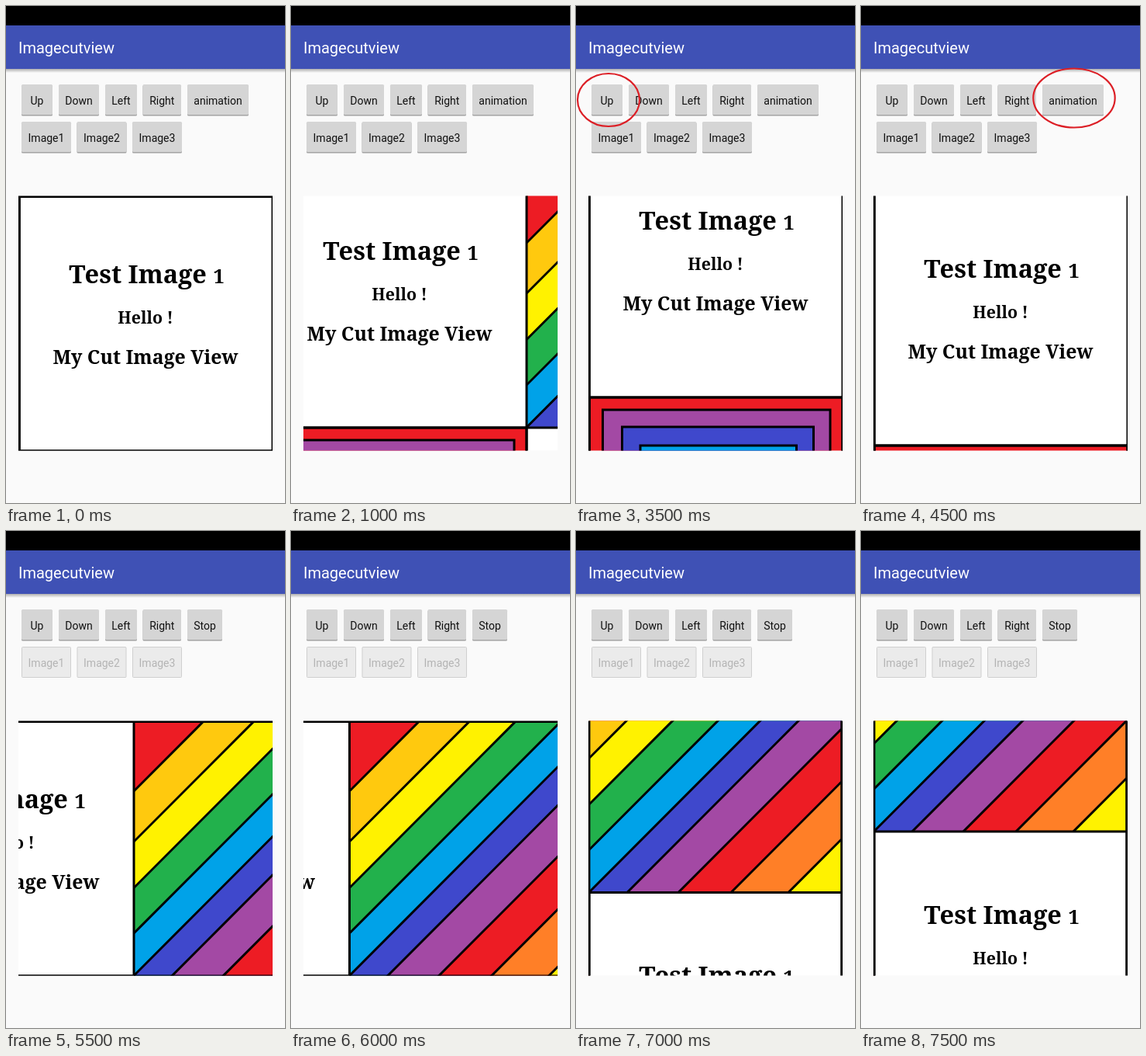
Animation of 360x640 px, one loop 8000 ms. Source, as an HTML page:

```html
<!DOCTYPE html>
<html lang="en">
<head>
<meta charset="utf-8">
<title>Image cut view</title>
<style>
html, body { margin: 0; height: 100%; overflow: hidden; background: #fafafa; }
svg { display: block; width: 100vw; height: 100vh; }
.ui { font: 14px Roboto, sans-serif; }
.title { font: 20px Roboto, sans-serif; fill: #fff; }
.words { font-family: "Noto Serif", serif; font-weight: 700; text-anchor: middle; }
.frame { fill: none; stroke: #000; stroke-width: 3; }
.ring { fill: none; stroke: #dc1f26; stroke-width: 2.2; }
</style>
</head>
<body>
<svg viewBox="0 0 360 640">
  <defs>
    <linearGradient id="shade" x2="0" y2="1">
      <stop stop-opacity=".3"/><stop offset="1" stop-opacity="0"/>
    </linearGradient>
    <clipPath id="view"><rect x="16" y="244.4" width="328" height="328.2"/></clipPath>
    <clipPath id="cell"><rect x="344" y="245" width="326" height="328"/></clipPath>
    <g id="words" class="words">
      <text x="181.5" y="356.5" font-size="32.5">Test Image <tspan font-size="25.5">1</tspan></text>
      <text x="180" y="409" font-size="21.3">Hello !</text>
      <text x="180" y="461.3" font-size="24.8">My Cut Image View</text>
    </g>
  </defs>
  <rect width="360" height="640" fill="#fafafa"/>
  <rect y="81" width="360" height="5" fill="url(#shade)"/>
  <rect y="25" width="360" height="56" fill="#3f51b5"/>
  <rect width="360" height="25"/>
  <text class="title" x="16" y="61">Imagecutview</text>
  <g id="buttons" class="ui"></g>
  <g clip-path="url(#view)">
    <g id="world">
      <rect x="16" y="244" width="656" height="660" fill="#fff"/>
      <use href="#words"/>
      <use href="#words" x="327" y="335"/>
      <g id="rainbow" clip-path="url(#cell)"></g>
      <g id="nested"></g>
      <path class="frame" d="M17.4 245.5H669.7V900H17.4ZM344 245V900M17 573H670"/>
    </g>
  </g>
  <ellipse id="ring" class="ring"/>
</svg>
<script>
const $ = id => document.getElementById(id);
const STEP = 500;
const red = '#ed1c24', yellow = '#fff200', cyan = '#00a2e8', blue = '#3f48cc', purple = '#a349a4';

// Each stripe covers everything beyond the diagonal x + y = sum.
const stripes = [[500, red], [679, '#ffc90e'], [744, yellow], [803.5, '#22b14c'], [862, cyan],
  [916.5, blue], [966, purple], [1032, red], [1100, '#ff7f27'], [1174, yellow]];
$('rainbow').innerHTML = stripes.map(([sum, fill]) =>
  `<path d="M${sum - 200} 200L${sum - 620} 620H1300V200Z" fill="${fill}" stroke="#000" stroke-width="3"/>`).join('');

// left, right, top, fill
const squares = [[17.4, 344, 573, red], [34.5, 328, 589, purple], [59.5, 306.5, 611, blue], [83, 284.5, 635, cyan]];
$('nested').innerHTML = squares.map(([l, r, t, fill]) =>
  `<rect x="${l}" y="${t}" width="${r - l}" height="${1473 - 2 * t}" fill="${fill}" stroke="#000" stroke-width="3"/>`).join('');

function button(label, x, y, w, off) {
  const box = off
    ? `<rect x="${x + .5}" y="${y + .5}" width="${w - 1}" height="39" rx="1" fill="#ebebeb" stroke="#cfcfcf"/>`
    : `<rect x="${x}" y="${y + 1}" width="${w}" height="39.5" rx="1.5" fill="#a4a4a4"/>
       <rect x="${x}" y="${y}" width="${w}" height="39" rx="1.5" fill="#d5d5d5"/>`;
  return box + `<text x="${x + w / 2}" y="${y + 26}" text-anchor="middle" fill="${off ? '#b4b4b4' : '#111'}">${label}</text>`;
}

function buttons(running) {
  const top = [['Up', 20, 40], ['Down', 68, 52], ['Left', 128, 41], ['Right', 176.5, 49.5],
    running ? ['Stop', 234, 45] : ['animation', 234, 79]];
  const low = [['Image1', 20, 64], ['Image2', 91.5, 64], ['Image3', 163, 64]];
  return top.map(([s, x, w]) => button(s, x, 101, w)).join('') +
    low.map(([s, x, w]) => button(s, x, 149, w, running)).join('');
}

const drag = [[0, 0], [0, 0], [-40, -30], [-80, -80], [-52.5, -69], [-25, -35], [0, 0], [0, -69], [0, -150], [0, -7]];
const rings = { 7: [42, 121, 40, 34], 8: [95, 121, 44, 34], 9: [275, 118.5, 52.7, 38] };

// The picture slides left by one cell, then up.
function offset(i) {
  if (i < 10) return drag[i];
  return i < 13 ? [-89.5 * (i - 9), 0] : [-327, -29 - 78.5 * (i - 13)];
}

let shown = -1;
function draw(now) {
  const i = Math.floor(now % (16 * STEP) / STEP);
  if (i !== shown) {
    shown = i;
    $('world').setAttribute('transform', `translate(${offset(i)})`);
    $('buttons').innerHTML = buttons(i > 9);
    const ring = rings[i] || [0, 0, 0, 0];
    ['cx', 'cy', 'rx', 'ry'].forEach((name, k) => $('ring').setAttribute(name, ring[k]));
  }
  requestAnimationFrame(() => draw(performance.now()));
}
draw(performance.now());
</script>
</body>
</html>
```
